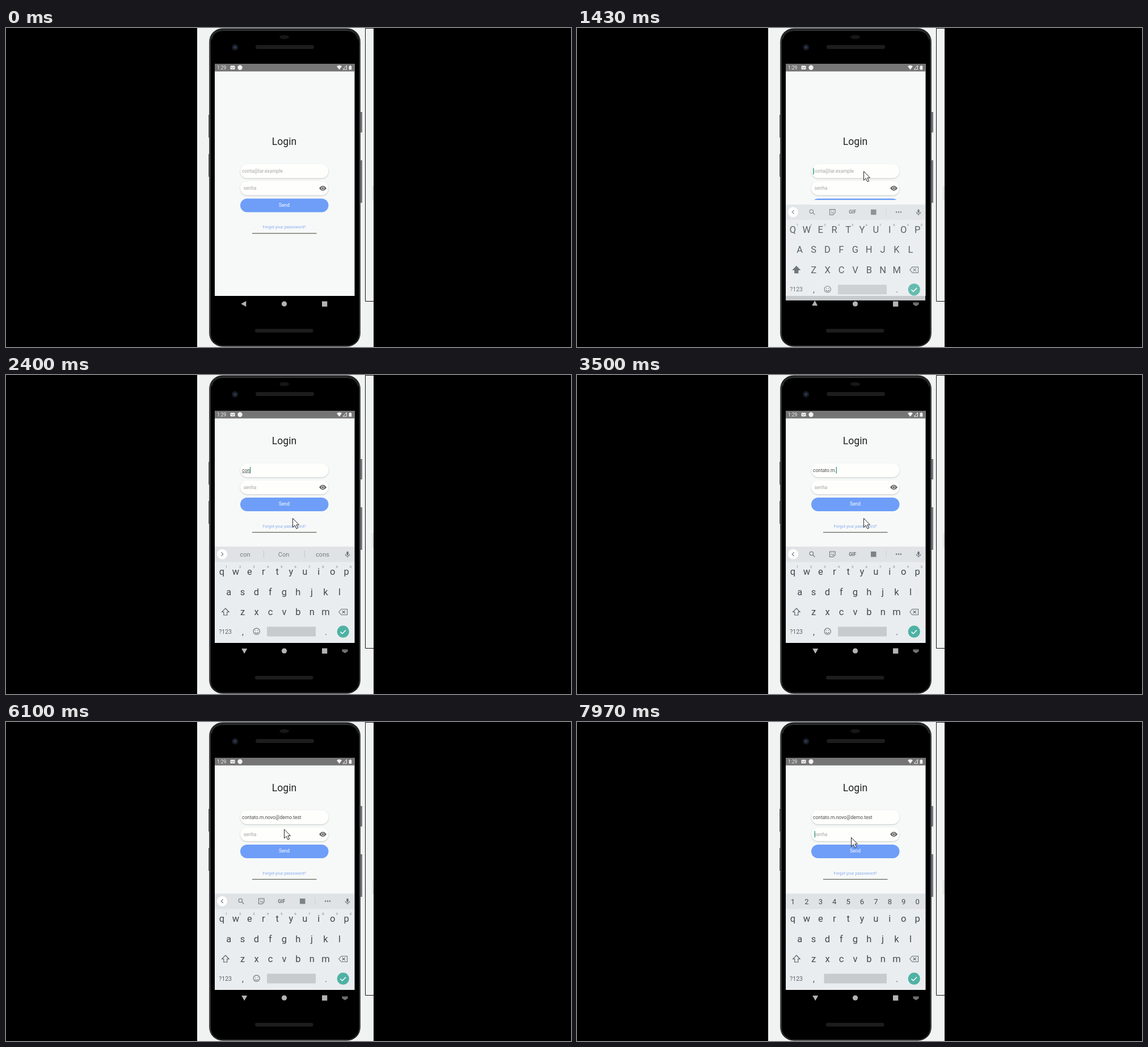
These frames come from a looping animation (996x562 px, 8 s). An HTML page:

```html
<!DOCTYPE html>
<html lang="en">
<head>
<meta charset="utf-8">
<title>Login form</title>
<style>
  html, body { margin: 0; width: 100%; height: 100%; overflow: hidden; background: #000; }
  svg { display: block; width: 100vw; height: 100vh; }
  text { font-family: Roboto, sans-serif; white-space: pre; }
  .mid { text-anchor: middle; }
  .line { fill: none; stroke: #697175; stroke-width: 1.1; }
  .field { fill: #fefefd; filter: drop-shadow(0 1px 1.2px #0003); }
  .hint { fill: #a6a6a4; }
</style>
</head>
<body>
<svg viewBox="0 0 996 562">
  <defs>
    <linearGradient id="edge">
      <stop offset="0" stop-color="#4a4c4e"/><stop offset=".016" stop-color="#232425"/>
      <stop offset=".984" stop-color="#232425"/><stop offset="1" stop-color="#4a4c4e"/>
    </linearGradient>
    <clipPath id="contentClip"><rect id="contentArea" x="368" y="76" width="246" height="396"/></clipPath>
    <clipPath id="keyboardClip"><rect x="368" y="63" width="246" height="417"/></clipPath>
  </defs>

  <!-- Desktop behind the phone -->
  <rect width="996" height="562"/>
  <rect x="337" width="311" height="562" fill="#f1f3f2"/>
  <path d="M648 .5H633.500V481.500H648" fill="none" stroke="#111"/>
  <rect x="645" y="278" width="3" height="26" fill="#dfe1e1"/>

  <!-- Phone body -->
  <path d="M626.500 148V184M626.500 233V308" stroke="#75787b" stroke-width="3"/>
  <path d="M357.500 153V193M357.500 222V262" stroke="#55575a"/>
  <rect x="358" y=".5" width="267" height="561" rx="24" fill="url(#edge)"/>
  <rect x="361" y="4" width="261.500" height="555" rx="21"/>
  <path d="M362.500 20Q365 4.500 383 4.500H601Q617 4.500 620.500 20" fill="none" stroke="#4c4f51" stroke-width=".8"/>
  <ellipse cx="490.500" cy="16" rx="8.500" ry="3.500" fill="#161719"/>
  <circle cx="403.700" cy="34" r="5.500" fill="#171b21"/>
  <circle cx="403.700" cy="34" r="2.300" fill="#2b3d59"/>
  <rect x="440" y="30" width="103" height="7" rx="3.500" fill="#1d1d1d"/>
  <rect x="439" y="530" width="102.500" height="6.500" rx="3" fill="#1d1d1d"/>

  <!-- Screen and status bar -->
  <rect x="368" y="63" width="246.500" height="409" fill="#f7f9f8"/>
  <rect x="368" y="63" width="246.500" height="13.500" fill="#757575"/>
  <g fill="#f1f1f1">
    <text x="372" y="73" font-size="8.500">1:29</text>
    <rect x="395.500" y="66.500" width="8" height="6.500" rx="1"/>
    <path d="M397 69L399.500 71L402 69" fill="none" stroke="#757575"/>
    <circle cx="412.500" cy="69.700" r="4.200"/>
    <path d="M583 67.500Q587.500 64 592 67.500L587.500 73.500Z"/>
    <path d="M594 73L600.500 66V73Z" fill="none" stroke="#f1f1f1"/>
    <path d="M604.500 67H606V66H608V67H609.200V73.500H604.500Z"/>
  </g>

  <!-- Form -->
  <g clip-path="url(#contentClip)"><g id="form">
    <text class="mid" x="490.500" y="206" font-size="17.600" fill="#222">Login</text>
    <rect class="field" x="413" y="240" width="155.500" height="24.500" rx="12.200"/>
    <rect class="field" x="413" y="270" width="155.500" height="24.500" rx="12.200"/>
    <text id="placeholder" class="hint" x="416" y="255.400" font-size="8.460">conta@lar.example</text>
    <text id="email" x="416" y="255.400" font-size="8.460" fill="#4c4c4c"></text>
    <path id="composing" stroke="#444" stroke-width=".8"/>
    <text class="hint" x="418.700" y="285.400" font-size="8.460">senha</text>
    <path d="M552 282.300Q558.500 273.500 565 282.300Q558.500 291 552 282.300Z" fill="#666"/>
    <circle cx="558.500" cy="282.300" r="2.300" fill="#666" stroke="#fff"/>
    <rect x="413" y="300.500" width="155.500" height="24" rx="12" fill="#6e9ef8"/>
    <text class="mid" x="490.500" y="314.600" font-size="8.400" fill="#fff">Send</text>
    <text class="mid" x="490.500" y="353.400" font-size="7.100" fill="#86abf0">Forgot your passoword?</text>
    <path d="M434 361.700H547.500" stroke="#797b73" stroke-width="1.400"/>
    <rect id="caret" width="1.300" height="11.500" fill="#279a85"/>
  </g></g>

  <!-- Navigation bar -->
  <g fill="#b4b4b4">
    <path id="back" d="M414.300 486L423.300 481V491Z"/>
    <circle cx="490.500" cy="486" r="4.600"/>
    <rect x="557" y="481.500" width="9.300" height="9.300"/>
    <path id="switcher" d="M592.500 483.500H602.500V487L597.500 490L592.500 487ZM594 485.300H601" fill="#777" stroke="#444" stroke-width=".6"/>
  </g>

  <!-- Keyboard -->
  <g clip-path="url(#keyboardClip)"><g id="keyboard">
    <rect x="368" y="302.500" width="246.500" height="169.500" fill="#e9edef"/>
    <rect x="368" y="302.500" width="246.500" height="27" fill="#dfe3e6"/>
    <g id="strip">
      <circle cx="381" cy="315.700" r="9" fill="#fff"/>
      <path id="chevron" class="line" d="M382.500 312.500L379.300 315.700L382.500 319"/>
      <path d="M600.300 312.500a1.700 1.700 0 0 1 3.400 0v3a1.700 1.700 0 0 1-3.400 0Z" fill="#697175"/>
      <path class="line" d="M598.200 315.500Q598.500 319 602 319T605.800 315.500M602 319V321.500"/>
    </g>
    <g id="tools">
      <circle class="line" cx="413.300" cy="314.500" r="3.200"/>
      <path class="line" d="M415.600 316.800L419.300 320.500"/>
      <path class="line" d="M445.500 311H455V317L451.500 320.500H445.500ZM447.800 316Q450 318.500 452.500 316M448 313.500H449M451.500 313.500H452.500"/>
      <text class="mid" x="485.700" y="318.700" font-size="8.500" font-weight="700" fill="#697175">GIF</text>
      <rect x="518" y="311" width="9.500" height="9.500" fill="#7b8387"/>
      <path d="M545 309V322" stroke="#cbd0d4"/>
      <path d="M562 315.700H572" stroke="#697175" stroke-width="2.200" stroke-dasharray="2.200 1.700"/>
    </g>
    <g id="words"><path d="M454.500 309V322M526.500 309V322" stroke="#c5cacd"/></g>
    <g id="digits"></g>
    <g id="corners"></g>
    <g id="letters"></g>
    <path id="shift" d="M386.800 411L393 417.500H389.800V423H383.800V417.500H380.600Z" stroke="#596165" stroke-width="1.200"/>
    <path class="line" d="M586.800 417.500L591 412.500H601.500V422.500H591ZM592.500 415L598 420M598 415L592.500 420"/>
    <g id="emoji">
      <circle class="line" cx="441.700" cy="451.700" r="5.600"/>
      <path class="line" d="M438.700 453Q441.700 457 444.700 453M439 450H440.300M443 450H444.300"/>
    </g>
    <rect id="space" y="443.500" height="17" rx="1" fill="#c7cbce"/>
    <circle cx="594.300" cy="452.200" r="10.600" fill="#4eb2a4"/>
    <path d="M589.500 452.500L592.800 455.700L599 449.500" fill="none" stroke="#fff" stroke-width="1.500"/>
  </g></g>

  <path id="pointer" d="M0 0V15.800L3.700 12.400L6.500 18.300L9.100 17.100L6.400 11.400H11Z" fill="#fff" stroke="#222" stroke-width="1"/>
</svg>
<script>
const LOOP = 8000, KEY_STEP = 24.4;
const ADDRESS = "contato.m.novo@demo.test";
const KEY_TIMES = [
  1850, 2080, 2300, 2500, 2650, 2800, 2950, 3100, 3250, 3400, 3700, 3830,
  3960, 4090, 4240, 4450, 4600, 4750, 4900, 5030, 5200, 5320, 5440, 5560
];
const FOCUS_EMAIL = 1250, RESIZE = 1490, FOCUS_PASSWORD = 6600;
const POINTER_PATH = [
  [100, 585, 562], [750, 505, 252], [5900, 505, 252],
  [6100, 490, 188.5], [6400, 483, 203]
];

const $ = id => document.getElementById(id);
const clamp = v => Math.max(0, Math.min(1, v));
const show = (id, on) => $(id).setAttribute("visibility", on ? "visible" : "hidden");
const setAttrs = (el, attrs) => {
  for (const name in attrs) el.setAttribute(name, attrs[name]);
};

function addText(parent, str, x, middle, size, fill = "#40494d") {
  const el = document.createElementNS("http://www.w3.org/2000/svg", "text");
  setAttrs(el, { x, y: middle + size * 0.37, "font-size": size, fill, class: "mid" });
  el.textContent = str;
  $(parent).append(el);
  return el;
}

const letterKeys = [["qwertyuiop", 380.5, 346.3], ["asdfghjkl", 392.7, 381.6], ["zxcvbnm", 417.2, 417.2]]
  .flatMap(([row, x, y]) => [...row].map((c, i) => addText("letters", c, x + i * KEY_STEP, y, 16.5)));
[..."1234567890"].forEach((digit, i) => {
  const x = 380.5 + i * KEY_STEP;
  addText("corners", digit, x + 7.7, 338, 6, "#7b8388");
  addText("digits", digit, x, 316.3, 13);
});
addText("keyboard", "?123", 386.7, 451.8, 10.5, "#596165");
addText("keyboard", ",", 417.4, 452, 15);
addText("keyboard", ".", 564, 452, 15);
const wordLabels = [421.5, 489.5, 558].map(x => addText("words", "", x, 316.3, 11, "#747c81"));

function pointerAt(t) {
  const next = POINTER_PATH.findIndex(p => p[0] > t);
  if (next < 0) return POINTER_PATH.at(-1).slice(1);
  const [t0, x0, y0] = POINTER_PATH[Math.max(0, next - 1)];
  const [t1, x1, y1] = POINTER_PATH[next];
  const p = clamp((t - t0) / (t1 - t0));
  return [x0 + (x1 - x0) * p, y0 + (y1 - y0) * p];
}

function drawForm(t, count) {
  const onPassword = t >= FOCUS_PASSWORD;
  const composing = count > 0 && count < 8;
  $("email").textContent = ADDRESS.slice(0, count);
  show("placeholder", !count);
  const width = count ? $("email").getComputedTextLength() : 0;
  $("composing").setAttribute("d", composing ? `M416 256.700h${width}` : "");

  const lastInput = onPassword ? FOCUS_PASSWORD : count ? KEY_TIMES[count - 1] : FOCUS_EMAIL;
  show("caret", t >= FOCUS_EMAIL && Math.floor((t - lastInput) / 500) % 2 === 0);
  setAttrs($("caret"), onPassword ? { x: 418.5, y: 276.5 } : { x: 416 + width, y: 246.5 });

  $("form").setAttribute("transform", `translate(0 ${t >= RESIZE ? -84.5 : 0})`);
  $("contentArea").setAttribute("height", t >= 1400 ? 227 : 396);
}

function drawKeyboard(t, count) {
  const rise = clamp((t - 1280) / 200);
  const upper = count === 0;
  const mode = t >= FOCUS_PASSWORD ? "digits" : count > 0 && count < 8 ? "words" : "tools";
  const words = mode === "words";
  setAttrs($("keyboard"), {
    transform: `translate(0 ${144 * (1 - rise) ** 2})`,
    opacity: rise && 0.42 + 0.58 * rise
  });
  for (const id of ["tools", "words", "digits"]) show(id, id === mode);
  for (const id of ["strip", "corners", "emoji"]) show(id, mode !== "digits");
  for (const key of letterKeys) {
    key.textContent = upper ? key.textContent.toUpperCase() : key.textContent.toLowerCase();
  }
  $("shift").setAttribute("fill", upper ? "#596165" : "none");
  $("chevron").setAttribute("transform", words ? "rotate(180 381 315.700)" : "");
  setAttrs($("space"), mode === "digits" ? { x: 435.5, width: 110.5 } : { x: 460, width: 86 });

  if (words) {
    const stem = ADDRESS.slice(0, count);
    const options = [stem, stem[0].toUpperCase() + stem.slice(1), stem + "s"];
    wordLabels.forEach((label, i) => label.textContent = options[i]);
  }
  $("back").setAttribute("transform", `rotate(${270 * clamp((t - 1380) / 150)} 419.700 485.500)`);
  show("switcher", t >= 1380);
}

function render(t) {
  const count = KEY_TIMES.filter(time => time <= t).length;
  drawForm(t, count);
  drawKeyboard(t, count);
  show("pointer", t >= 100);
  $("pointer").setAttribute("transform", `translate(${pointerAt(t).map(v => v + 0.5)})`);
}

function tick() {
  render(performance.now() % LOOP);
  requestAnimationFrame(tick);
}
tick();
</script>
</body>
</html>
```
